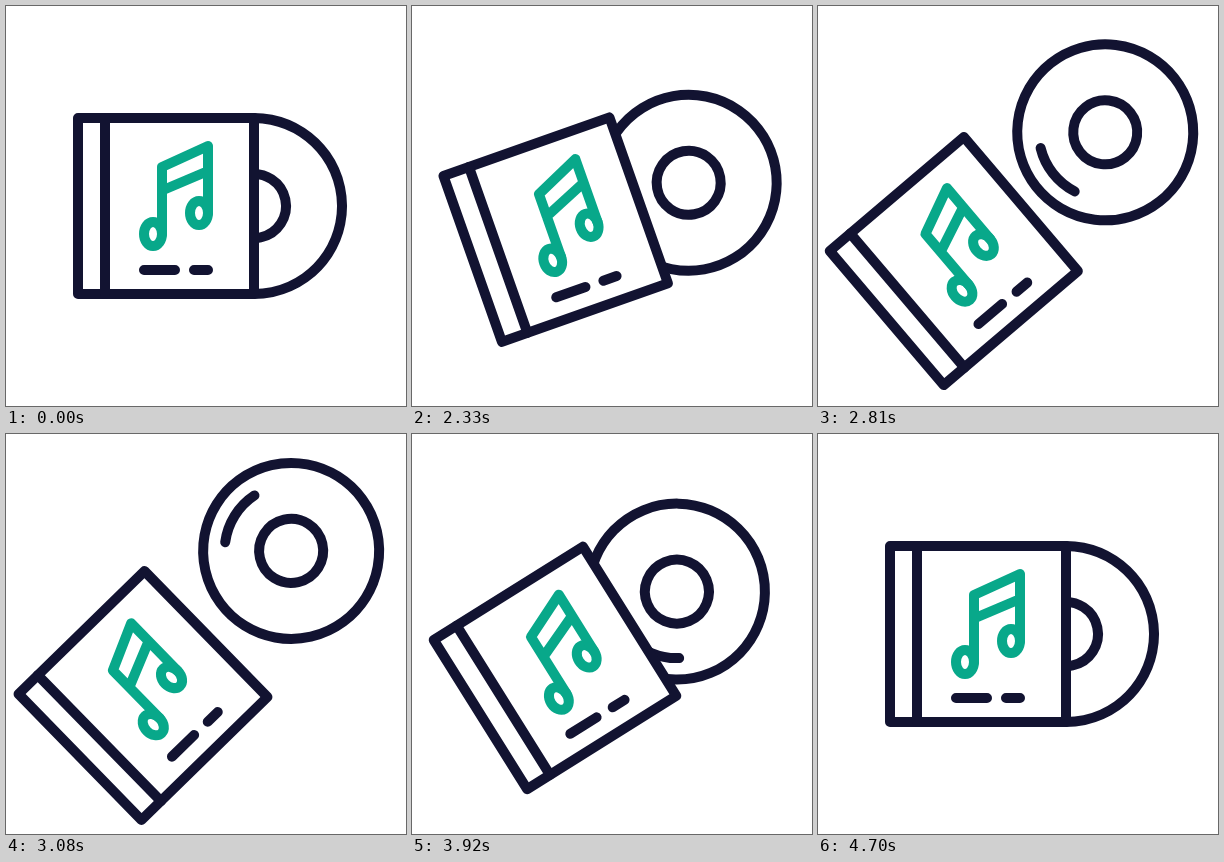
An HTML page for the animation above (4730 ms loop, 400x400 px).

```html
<!DOCTYPE html>
<html lang="en">
<head>
<meta charset="utf-8">
<title>Music disc</title>
<style>
  html, body { margin: 0; width: 100%; height: 100%; overflow: hidden; background: #fff; }
  svg { display: block; width: 100%; height: 100%; }
  g { fill: none; stroke: #121331; stroke-width: 10; stroke-linecap: round; stroke-linejoin: round; }
  #note { stroke: #08a88a; }
</style>
</head>
<body>
<svg viewBox="0 0 400 400">
  <g id="disc">
    <circle r="88"/>
    <circle r="32"/>
    <path id="shine"/>
  </g>
  <!-- The case is drawn around its own centre -->
  <g id="case">
    <rect x="-88" y="-88" width="176" height="176" fill="#fff"/>
    <path d="M-61 -88V88M-22 64H9M28 64H42"/>
    <g id="note">
      <ellipse cx="-13" cy="28" rx="9" ry="12"/>
      <ellipse cx="33" cy="7" rx="9" ry="12"/>
      <path d="M-4 28V-39L42 -60V7M-4 -15.5L42 -35"/>
    </g>
  </g>
</svg>
<script>
const LOOP = 4730;
const RAD = Math.PI / 180;

const times = [2000, 2133, 2279, 2474, 2540, 2600, 3080, 3160, 3650, 3920, 4190, 4330, 4700];
const tracks = {
  tilt:  [0, -4.7, -15.8, -28.8, -32.9, -35.3, -44.3, -44.6, -42.9, -32.1, -1.2, 6.5, 0],
  x:     [160, 156.5, 147, 136, 134.6, 134.8, 137, 137.2, 138.8, 143, 149.7, 151.2, 160],
  y:     [200, 205, 219, 236, 242, 246.5, 261.5, 262, 257.2, 234, 200.5, 200, 200],
  slide: [88, 99, 130, 170, 181, 187, 207, 207.3, 195, 144, 75, 72, 88],
  spin:  [-507, -435, -254, -32, 10, 46, 212, 213, 198, 113, -90, -147, -147]
};

// Monotone cubic slopes: flat at both ends and at every turning point
function slopes(values) {
  const rate = i => (values[i + 1] - values[i]) / (times[i + 1] - times[i]);
  return values.map((_, i) => {
    if (i === 0 || i === values.length - 1) return 0;
    const a = rate(i - 1), b = rate(i);
    return a * b > 0 ? 2 * a * b / (a + b) : 0;
  });
}

function makeTrack(values) {
  const m = slopes(values), last = times.length - 1;
  return t => {
    if (t <= times[0]) return values[0];
    if (t >= times[last]) return values[last];
    const i = times.findIndex(k => k > t) - 1;
    const h = times[i + 1] - times[i];
    const u = (t - times[i]) / h, v = 1 - u;
    return values[i] * v * v * (1 + 2 * u) + values[i + 1] * u * u * (3 - 2 * u)
      + h * u * v * (m[i] * v - m[i + 1] * u);
  };
}

const tilt = makeTrack(tracks.tilt);
const caseX = makeTrack(tracks.x);
const caseY = makeTrack(tracks.y);
const slide = makeTrack(tracks.slide);
const spin = makeTrack(tracks.spin);

const disc = document.getElementById('disc');
const box = document.getElementById('case');

const polar = (r, deg) => `${r * Math.cos(deg * RAD)} ${r * Math.sin(deg * RAD)}`;
document.getElementById('shine')
  .setAttribute('d', `M${polar(66.5, -24.5)}A66.5 66.5 0 0 1 ${polar(66.5, 24.5)}`);

function place(el, x, y, angle) {
  el.setAttribute('transform', `translate(${x} ${y}) rotate(${angle})`);
}

function draw(t) {
  const angle = tilt(t), x = caseX(t), y = caseY(t), d = slide(t);
  place(box, x, y, angle);
  place(disc, x + d * Math.cos(angle * RAD), y + d * Math.sin(angle * RAD), spin(t));
}

const start = performance.now();
function tick() {
  draw((performance.now() - start) % LOOP);
  requestAnimationFrame(tick);
}
tick();
</script>
</body>
</html>
```
